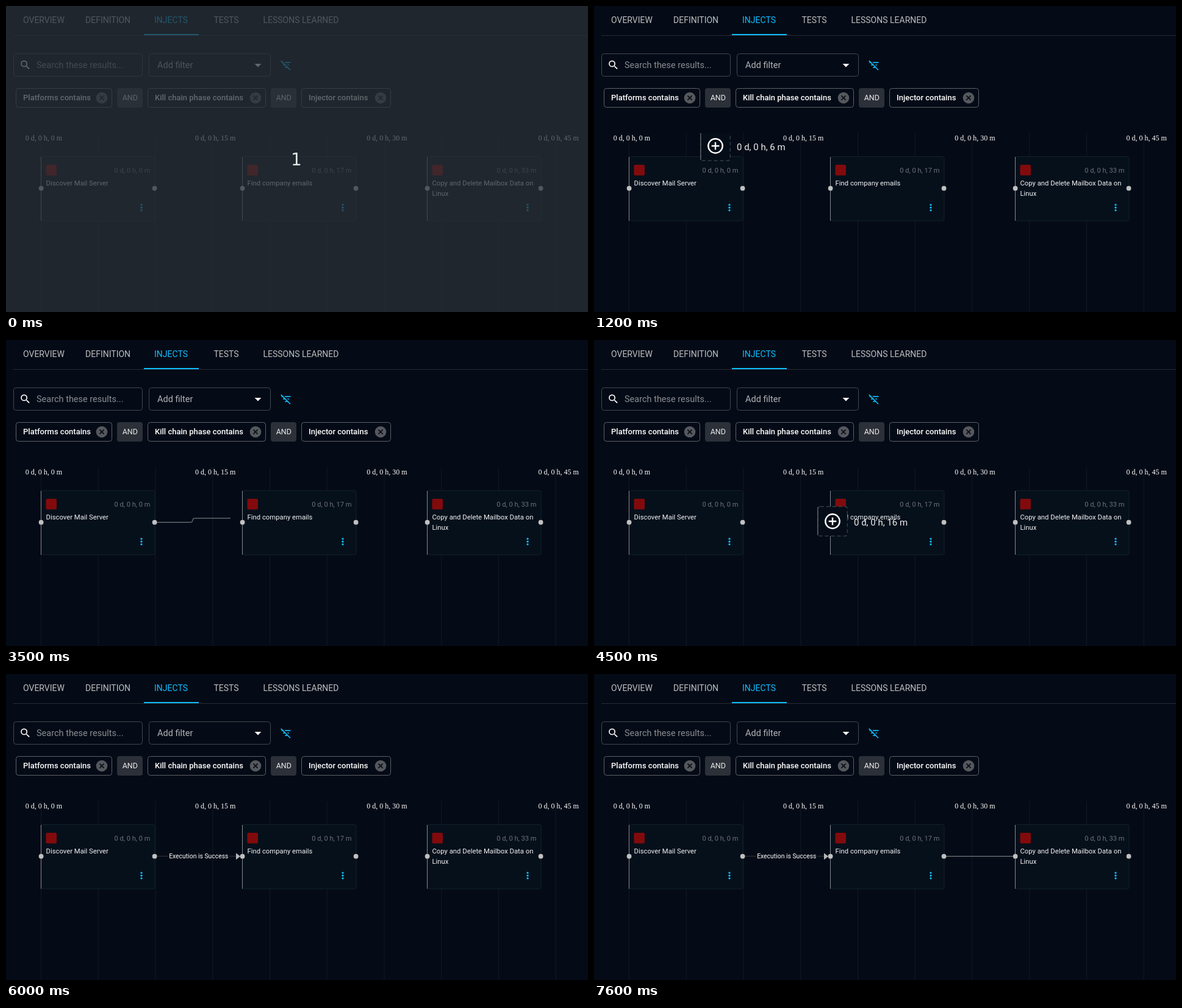
Recreate the animation shown at these times as an HTML page. Size 954 by 503 pixels, loop 8000 ms.

```html
<!DOCTYPE html>
<html lang="en">
<head>
<meta charset="utf-8">
<title>Inject timeline</title>
<style>
  html, body { margin: 0; width: 100%; height: 100%; overflow: hidden; background: #050b16; }
  svg { display: block; width: 954px; height: 503px; }
  text { font-family: Roboto, "Noto Sans", sans-serif; fill: #fff; white-space: pre; }
  .tab { font-size: 14px; fill: #bcbec1; }
  .active { fill: #0fbcff; }
  .field { font-size: 14.5px; fill: #b2b4b8; }
  .hint { fill: #898c92; }
  .chip { font-size: 13px; font-weight: 500; }
  .and { font-size: 12.5px; fill: #e6e6e8; text-anchor: middle; }
  .axis { font-family: "Liberation Serif", "Times New Roman", serif; font-size: 12px; text-anchor: middle; }
  .time { font-size: 11.1px; fill: #6d7279; text-anchor: end; }
  .title { font-size: 11.3px; fill: #f2f3f4; }
  .edge { font-size: 10.4px; text-anchor: middle; }
  .ghost { font-size: 15px; fill: #eef0f1; }
  .count { font-family: "DejaVu Sans", sans-serif; font-size: 28px; fill: #dfe5e3; text-anchor: middle; }
</style>
</head>
<body>
<svg viewBox="0 0 954 503" xmlns="http://www.w3.org/2000/svg">
  <defs><clipPath id="pane"><rect y="209" width="954" height="294"/></clipPath></defs>
  <rect width="954" height="503" fill="#050b16"/>
  <g id="header"></g>
  <g id="grid"></g>
  <g id="cards"></g>
  <path id="drag" fill="none" stroke="#8e9296"/>
  <g id="edge">
    <path d="M247 299.5H378" stroke="#30353b"/>
    <rect x="265" y="293" width="101" height="13" fill="#050b16"/>
    <text class="edge" x="315.8" y="303">Execution is Success</text>
    <path d="M377 294.3V305.3L384 299.8Z" fill="#b4b5b8"/>
  </g>
  <g id="handles" fill="#c0c0c0"></g>
  <g clip-path="url(#pane)">
    <g id="ghost">
      <rect x=".75" y=".75" width="48.5" height="48.5" rx="4" fill="#050d18" stroke="#353c43" stroke-width="1.4" stroke-dasharray="6 4"/>
      <path d="M.8 2V48" stroke="#62676c" stroke-width="1.4"/>
      <circle cx="25" cy="25" r="11.7" fill="none" stroke="#fff" stroke-width="2.4"/>
      <path d="M25 18.7V31.3M18.7 25H31.3" stroke="#fff" stroke-width="2.4"/>
      <text id="ghostTime" class="ghost" x="60" y="32"></text>
    </g>
  </g>
  <g id="intro">
    <rect width="954" height="503" fill="#2a3038" opacity=".73"/>
    <text class="count" x="476" y="262">1</text>
  </g>
</svg>
<script>
const LOOP = 8000, STEP = 100;
const ORIGIN = 57, PX_PER_MINUTE = 18.75, HANDLE_Y = 299.7;
const $ = id => document.getElementById(id);
const text = (cls, x, y, s) => `<text class="${cls}" x="${x}" y="${y}">${s}</text>`;
const box = (x, y, w, h, attrs) => `<rect x="${x + .5}" y="${y + .5}" width="${w - 1}" height="${h - 1}" ${attrs}/>`;
const icon = (x, y, color, d) =>
  `<path transform="translate(${x} ${y}) scale(.8333)" fill="${color}" d="${d}"/>`;
const clock = minutes => `0 d, 0 h, ${minutes} m`;

function chip(x, w, label) {
  const cx = x + w - 17;
  return box(x, 135, w, 32, 'rx="4" fill="none" stroke="#5c6066"') + text('chip', x + 12, 155, label) +
    `<circle cx="${cx}" cy="151" r="9.3" fill="#55585d"/>
     <path d="M${cx - 3.6} 147.4l7.2 7.2m0 -7.2l-7.2 7.2" stroke="#070d17" stroke-width="1.7"/>`;
}

const and = x => `<rect x="${x}" y="135" width="42" height="32" rx="4" fill="#2c3038"/>` +
  text('and', x + 21.3, 155, 'AND');

function card(x, minutes, lines) {
  const dots = [326.8, 331.3, 335.8].map(y => `<circle cx="${x + 165}" cy="${y}" r="1.65"/>`).join('');
  return box(x, 247, 187.5, 106.5, 'rx="3" fill="#06101b" stroke="#11222b"') +
    `<path d="M${x + .5} 248V353" stroke="#85898d"/>
     <rect x="${x + 8.5}" y="261" width="17.5" height="17.5" rx="2" fill="#820a0c"/>
     <g fill="#0fbcff">${dots}</g>` +
    text('time', x + 179.5, 274, clock(minutes)) +
    lines.map((s, i) => text('title', x + 8.5, 295 + 17 * i, s)).join('');
}

const tabs = [[28, 'OVERVIEW'], [130, 'DEFINITION'], [243, 'INJECTS'], [340.5, 'TESTS'], [421.5, 'LESSONS LEARNED']];
$('header').innerHTML =
  '<path d="M12 48.5H954" stroke="#252a32"/><path d="M226 47H316" stroke="#0fbcff" stroke-width="2"/>' +
  tabs.map(([x, s]) => text(s === 'INJECTS' ? 'tab active' : 'tab', x, 27.8, s)).join('') +
  box(12, 78, 212, 38, 'id="search" rx="4" fill="none"') +
  box(234, 78, 200, 38, 'rx="4" fill="none" stroke="#42464d"') +
  icon(21.7, 87, '#fff', 'M15.5 14h-.79l-.28-.27A6.47 6.47 0 0 0 16 9.5 6.5 6.5 0 1 0 9.5 16c1.61 0 3.09-.59 4.23-1.57l.27.28v.79l5 4.99L20.49 19zm-6 0a4.5 4.5 0 1 1 0-9 4.5 4.5 0 0 1 0 9z') +
  text('field hint', 50, 102, 'Search these results...') +
  text('field', 248, 102, 'Add filter') +
  '<path d="M407.6 95H418.4L413 100.4Z" fill="#fff"/>' +
  icon(449, 87, '#0fbcff', 'M10.83 8H21V6H8.83zm5 5H18v-2h-4.17zM14 16.83V18h-4v-2h3.17l-3-3H6v-2h2.17l-3-3H3V6h.17L1.39 4.22 2.8 2.81l18.38 18.38-1.41 1.41z') +
  chip(16, 158, 'Platforms contains') + and(182) +
  chip(232, 194, 'Kill chain phase contains') + and(434) +
  chip(484, 147, 'Injector contains');

let grid = '';
for (let i = 0; i < 10; i++) grid += `<path d="M${ORIGIN + .5 + i * 93.75} 209V503" stroke="#10171f" stroke-width="1.3"/>`;
for (let i = 0; i < 4; i++) grid += text('axis', 62 + i * 281.25, 221, clock(i * 15));
$('grid').innerHTML = grid;

const cards = [
  [57, 0, ['Discover Mail Server']],
  [387, 17, ['Find company emails']],
  [690, 33, ['Copy and Delete Mailbox Data on', 'Linux']]
];
$('cards').innerHTML = cards.map(c => card(...c)).join('');
$('handles').innerHTML = cards.flatMap(([x]) => [x + .6, x + 186.6])
  .map(x => `<circle cx="${x}" cy="${HANDLE_Y}" r="3.9"/>`).join('');

// Each track: visible until `end`; points are [time, x, y].
const ghostTracks = [
  { end: 1300, points: [[1100, 165, 200], [1200, 174, 205]] },
  { end: 2300, points: [[1700, 220, 264], [2000, 222, 265], [2200, 221, 268]] },
  { end: 4700, points: [[4400, 364, 273], [4500, 366, 273]] },
  { end: 5000, points: [[4700, 381, 340], [4800, 351, 364]] },
  { end: 5400, points: [[5000, 430, 360], [5100, 550, 352], [5200, 646, 347]] },
  { end: 6000, points: [[5400, 649, 346], [5500, 638, 338], [5700, 594, 300], [5900, 556, 270]] }
];
const dragTracks = [
  { end: 4400, from: 244, points: [[2900, 251, 299], [3100, 268, 299], [3300, 314, 296], [3500, 368, 293], [3600, 380, 295], [3700, 388, HANDLE_Y]] },
  { end: LOOP, from: 574, points: [[6500, 576, 297], [6600, 618, 302], [6700, 664, 302], [6800, 690, HANDLE_Y]] }
];

function sample(tracks, t) {
  const track = tracks.find(k => t >= k.points[0][0] && t < k.end);
  if (!track) return null;
  const { points } = track;
  const i = points.findIndex(p => p[0] > t);
  if (i < 0) return { track, x: points.at(-1)[1], y: points.at(-1)[2] };
  const [a, b] = [points[i - 1], points[i]];
  const k = (t - a[0]) / (b[0] - a[0]);
  return { track, x: a[1] + (b[1] - a[1]) * k, y: a[2] + (b[2] - a[2]) * k };
}

// Right-angled connector with rounded bends, leaving right and arriving from the left.
function connector(sx, sy, tx, ty) {
  const gap = 20, mid = (sx + tx) / 2, midY = (sy + ty) / 2;
  const bends = sx + gap < tx - gap
    ? [[mid, sy], [mid, ty]]
    : [[sx + gap, sy], [sx + gap, midY], [tx - gap, midY], [tx - gap, ty]];
  const pts = [[sx, sy], ...bends, [tx, ty]];
  const dist = (a, b) => Math.hypot(a[0] - b[0], a[1] - b[1]);
  const toward = (a, b, r) => a.map((v, i) => v + (b[i] - v) * r / (dist(a, b) || 1));
  let d = `M${pts[0]}`;
  for (let i = 1; i < pts.length - 1; i++) {
    const [a, b, c] = pts.slice(i - 1, i + 2);
    const r = Math.min(5, dist(a, b) / 2, dist(b, c) / 2);
    d += `L${toward(b, a, r)}Q${b} ${toward(b, c, r)}`;
  }
  return d + `L${pts.at(-1)}`;
}

const show = (id, on) => $(id).setAttribute('visibility', on ? 'visible' : 'hidden');

function render(ms) {
  const t = Math.floor(ms / STEP) * STEP;
  show('intro', t < 100);
  show('edge', t >= 4700);
  $('search').setAttribute('stroke', t >= 700 && t < 900 ? '#fff' : '#42464d');

  const ghost = sample(ghostTracks, t);
  show('ghost', ghost);
  if (ghost) {
    $('ghost').setAttribute('transform', `translate(${ghost.x} ${ghost.y})`);
    $('ghostTime').textContent = clock(Math.floor((ghost.x - ORIGIN) / PX_PER_MINUTE));
  }

  const drag = sample(dragTracks, t);
  show('drag', drag);
  if (drag) $('drag').setAttribute('d', connector(drag.track.from, HANDLE_Y, drag.x, drag.y));
}

const start = performance.now();
function tick() {
  render((performance.now() - start) % LOOP);
  requestAnimationFrame(tick);
}
tick();
</script>
</body>
</html>
```
